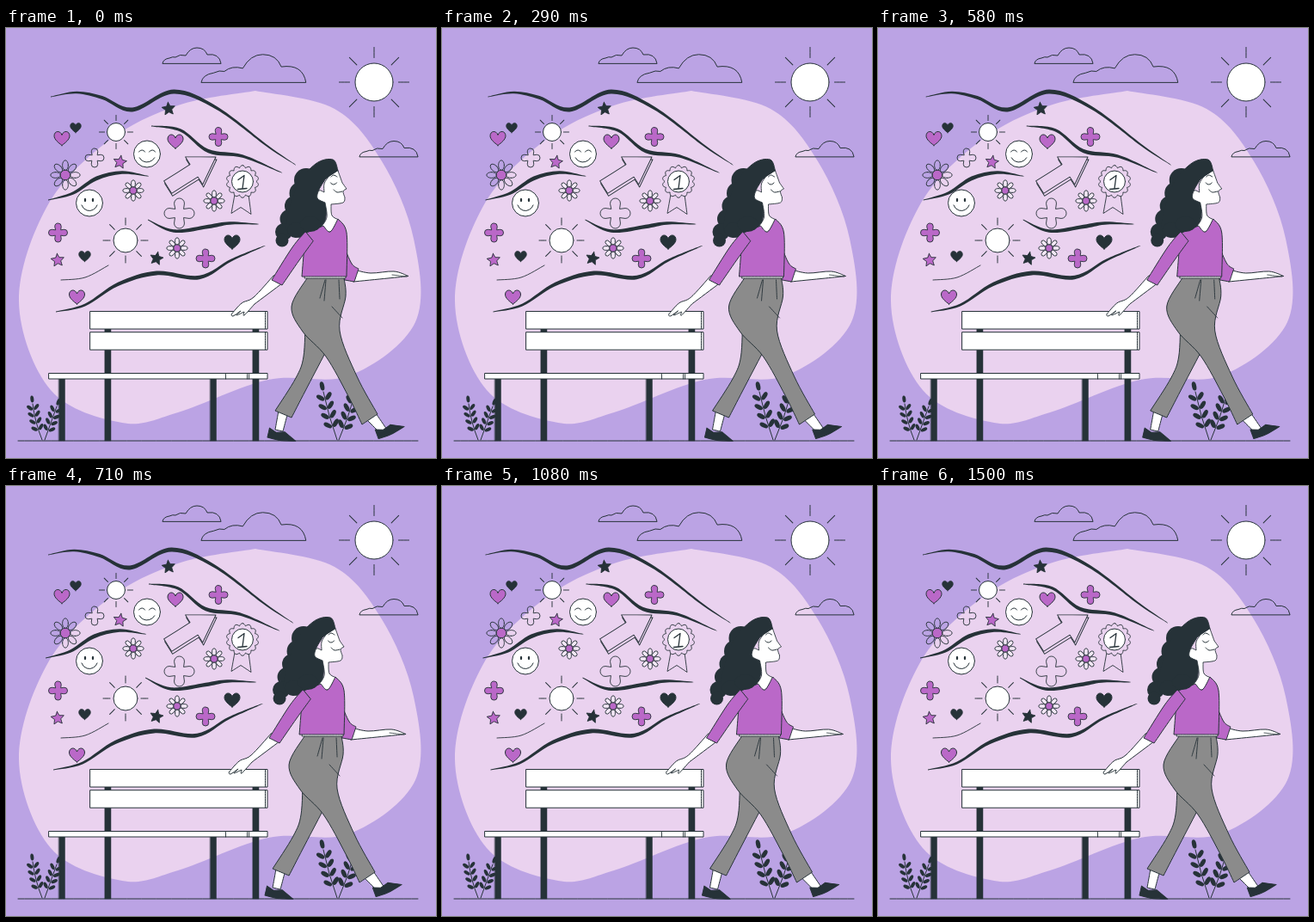
These frames come from a looping animation (500 px wide and 500 px high, 1.54 s). An HTML page with a canvas:

```html
<!DOCTYPE html>
<html lang="en">
<head>
<meta charset="utf-8">
<title>A walk in the breeze</title>
<style>
html, body { margin: 0; width: 100%; height: 100%; overflow: hidden; background: #bba3e4; }
canvas { display: block; width: 100vw; height: 100vh; }
</style>
</head>
<body>
<canvas id="stage" width="500" height="500"></canvas>
<script>
const ctx = document.getElementById('stage').getContext('2d');
const SKY = '#bba3e4', PALE = '#ead2ef', PURPLE = '#ba68c8', DARK = '#263238', WHITE = '#fff', GREY = '#8b8b8b';
const TAU = Math.PI * 2;

const points = text => text.trim().split(/\s+/).map(p => p.split(',').map(Number));

// Smooth curves through key points; "|" marks a sharp corner.
function outline(text, closed = false) {
  const path = new Path2D();
  let last = null;
  for (const part of text.split('|')) {
    const pts = points(part);
    if (last) pts.unshift(last);
    else path.moveTo(...pts[0]);
    for (let i = 0; i < pts.length - 1; i++) {
      const a = pts[Math.max(i - 1, 0)], b = pts[i], c = pts[i + 1], d = pts[Math.min(i + 2, pts.length - 1)];
      path.bezierCurveTo(b[0] + (c[0] - a[0]) / 6, b[1] + (c[1] - a[1]) / 6,
        c[0] - (d[0] - b[0]) / 6, c[1] - (d[1] - b[1]) / 6, c[0], c[1]);
    }
    last = pts[pts.length - 1];
  }
  if (closed) path.closePath();
  return path;
}

function paint(path, fill, line = 1) {
  if (fill) { ctx.fillStyle = fill; ctx.fill(path); }
  if (line) { ctx.lineWidth = line; ctx.strokeStyle = DARK; ctx.stroke(path); }
}
const shape = (text, fill, line) => paint(outline(text, true), fill, line);
const stroke = (text, line) => paint(outline(text), null, line);

function oval(x, y, rx, ry = rx, fill = WHITE, line = 1) {
  const path = new Path2D();
  path.ellipse(x, y, rx, ry, 0, 0, TAU);
  paint(path, fill, line);
}
function box(x, y, w, h, fill = WHITE, line = 1) {
  const path = new Path2D();
  path.rect(x, y, w, h);
  paint(path, fill, line);
}
function arc(x, y, r, from, to) {
  const path = new Path2D();
  path.arc(x, y, r, from * TAU, to * TAU);
  paint(path, null);
}
function at(x, y, turn, draw) {
  ctx.save();
  ctx.translate(x, y);
  ctx.rotate(turn);
  draw();
  ctx.restore();
}
function around(x, y, count, draw) {
  for (let i = 0; i < count; i++) at(x, y, i / count * TAU, draw);
}
// Closed figure whose radius is a function of the turn, 0 to 1.
function radial(x, y, steps, radius, fill, tilt = 0) {
  const path = new Path2D();
  for (let i = 0; i < steps; i++) {
    const a = (i / steps - 0.25) * TAU + tilt, r = radius(i / steps, i);
    path.lineTo(x + r * Math.cos(a), y + r * Math.sin(a));
  }
  path.closePath();
  paint(path, fill, 0.9);
}

// Swoosh that swells in the middle and tapers at both ends.
function swoosh(text, width) {
  const pts = points(text), n = pts.length - 1;
  const edge = side => pts.map(([x, y], i) => `${x},${y + side * (0.4 + width / 2 * Math.sin(Math.PI * i / n))}`);
  shape(edge(-1).join(' ') + '|' + edge(1).reverse().join(' '), DARK, 0);
}

function cloud(x, y, scale) {
  const path = new Path2D();
  path.addPath(new Path2D('M0 0Q1-5 8-6Q12-8 15-7Q20-11 27-9Q32-18 40-18Q49-18 52-10Q66-12 68 0Z'),
    new DOMMatrix([scale, 0, 0, scale, x, y]));
  paint(path);
}
function sun(x, y, r, near, far) {
  oval(x, y, r);
  around(x, y, 8, () => stroke(`${near},0 ${far},0`));
}
function heart(x, y, fill, size = 9) {
  at(x, y, 0, () => {
    ctx.scale(size / 9, size / 9);
    paint(new Path2D('M0 8C-4 5-9 1-9-3C-9-9-2-10 0-4C2-10 9-9 9-3C9 1 4 5 0 8Z'), fill);
  });
}
const star = (x, y, fill, tilt) => radial(x, y, 10, (t, i) => i % 2 ? 3.8 : 8, fill, tilt);

function cross(x, y, r, fill) {
  const w = r * 0.34, path = new Path2D();
  for (let i = 0; i < 4; i++) {
    const a = i * TAU / 4, s = Math.sin(a), c = Math.cos(a);
    path.arc(x + s * (r - w), y - c * (r - w), w, a + Math.PI, a + TAU);
    path.lineTo(x + w * 0.85 * (c + s), y + w * 0.85 * (s - c));
  }
  path.closePath();
  paint(path, fill, 0.9);
}
function flower(x, y, r, fill) {
  around(x, y, 8, () => oval(0, -r * 0.67, r * 0.2, r * 0.34, fill, 0.9));
  oval(x, y, r * 0.34, r * 0.34, PURPLE, 0.9);
}
function arrow(x, y) {
  at(x, y, -0.56, () => shape('0,0 | -30,-19 | -30,-8.5 | -66,-8.5 | -66,8.5 | -30,8.5 | -30,19', PALE, 0.9));
}
function medal(x, y) {
  shape(`${x - 9},${y + 15} | ${x - 13},${y + 37} | ${x - 2},${y + 30} | ${x + 10},${y + 38} | ${x + 7},${y + 15}`, PALE, 0.9);
  radial(x, y, 112, t => 16 + 2.8 * Math.abs(Math.cos(t * 7 * TAU)), PALE);
  oval(x, y, 12.5);
  stroke(`${x - 5},${y - 2} | ${x + 2},${y - 7} | ${x},${y + 8}`, 1.3);
  stroke(`${x - 5.5},${y + 9} ${x + 5},${y + 8}`, 1.3);
}

// Curved stem with paired leaves and one at the tip.
function branch(x0, y0, x1, y1, bend, pairs, size) {
  const cx = (x0 + x1) / 2 + bend, cy = (y0 + y1) / 2;
  paint(new Path2D(`M${x0} ${y0}Q${cx} ${cy} ${x1} ${y1}`));
  for (let i = 0; i <= pairs; i++) {
    const t = 0.25 + 0.75 * i / pairs, u = 1 - t;
    const x = u * u * x0 + 2 * u * t * cx + t * t * x1, y = u * u * y0 + 2 * u * t * cy + t * t * y1;
    const heading = Math.atan2(u * (cy - y0) + t * (y1 - cy), u * (cx - x0) + t * (x1 - cx));
    for (const side of i < pairs ? [-0.8, 0.8] : [0])
      at(x, y, heading + side, () => oval(size + 1.5, 0, size, size * 0.5, DARK, 0));
  }
}

function background() {
  ctx.fillStyle = SKY;
  ctx.fillRect(0, 0, 500, 500);
  shape('290,73 382,94 437,155 474,245 476,342 400,404 305,409 200,447 135,459 52,421 15,318 48,207 118,132 200,90 290,73', PALE, 0);
  cloud(182, 41, 1);
  cloud(227, 63, 1.79);
  cloud(411, 149.5, 1);
  sun(428, 63, 22, 28.5, 40.5);
}

function waves() {
  swoosh('52,80 82,75 112,81 147,95 195,74 245,93 305,138 335,158', 4.4);
  swoosh('169,114 203,119 235,143 275,149 318,167', 3.6);
  swoosh('49,200 78,192 105,175 135,168 164,172', 4);
  swoosh('165,223 195,236 235,231 260,227 292,228', 3.6);
  swoosh('58,330 92,322 130,298 175,285 225,290 262,270 299,254', 4);
}

function icons() {
  stroke('64,293 92,290 119,276', 0.9);
  sun(128, 121, 10.5, 13.5, 19.5);
  sun(139, 247, 14, 18, 26);

  star(189, 94, DARK, -0.1);
  star(132.5, 156, PURPLE, 0.15);
  star(60, 270, PURPLE, -0.1);
  star(175, 268, DARK, 0.2);

  heart(65, 128.5, PURPLE);
  heart(197, 132, PURPLE);
  heart(82.5, 313, PURPLE);
  heart(263, 249, DARK);
  heart(81, 116, DARK, 6.3);
  heart(91.5, 265.5, DARK, 6.8);

  cross(103, 151, 11, null);
  cross(201.5, 215.5, 17.5, null);
  cross(247, 126.5, 11, PURPLE);
  cross(60.5, 238, 11, PURPLE);
  cross(232, 268, 11, PURPLE);

  flower(69, 171, 17, null);
  flower(148, 189, 12, '#f4e8f7');
  flower(242, 201, 12, '#f4e8f7');
  flower(199, 256, 12, '#f4e8f7');

  oval(164, 146.5, 15.5);
  for (const x of [158, 170]) arc(x, 146, 4, 0.58, 0.92);
  arc(164, 146, 10, 0.08, 0.42);
  oval(97, 203.5, 15.5);
  for (const x of [92, 101]) oval(x, 200, 1.2, 2.2, DARK, 0);
  arc(97, 203, 9.5, 0.05, 0.45);

  arrow(245, 153);
  arrow(244, 150);
  medal(275, 178.5);
}

function scenery() {
  stroke('14,480 479,480');
  branch(42, 479, 31, 437, -3, 4, 4);
  branch(45, 479, 59, 440, 0, 4, 4);
  branch(385, 479, 369, 423, -2, 4, 5.2);
  branch(387, 479, 405, 428, 2, 4, 5.2);

  for (const x of [115, 287]) box(x, 340, 7, 140, DARK, 0.5);
  for (const x of [61.5, 237.5]) box(x, 405, 7, 75, DARK, 0.5);
  for (const y of [329.5, 353.7]) {
    box(98, y, 206, 20.5);
    stroke(`301.5,${y} 301.5,${y + 20}`);
  }
  box(50, 401.5, 254, 6.5);
  for (const x of [255.5, 280.5, 282.5]) stroke(`${x},401.5 ${x},408`);
}

function shoe(x, y, turn) {
  at(x, y, turn, () => shape('1,-11 -1,0 | 14,3 32,3 | 19,-7 | 9,-6', DARK));
}

function legs() {
  shape('317,445 | 313,467 | 322,469 | 327,450', WHITE);
  shoe(305, 476, 0.04);
  shape('348,340 346,382 337,407 313,445 | 332,453 | 348,422 370,380', GREY);
  shape('419,455 | 434,470 | 443,467 | 430,448', WHITE);
  shoe(434, 477, -0.53);
  shape('350,291 332,324 345,353 372,382 398,428 414,461 | 432,449 | 408,405 388,352 395,312 393,291', GREY);
  stroke('371,293 365,314', 0.9);
  stroke('372,293 370,317', 0.9);
  stroke('387,293 388,315', 0.9);
  stroke('379,324 391,337', 0.9);
}

function farArm() {
  shape('405,281 424,285 451,283 468,288.5 | 444,291 404,295', WHITE);
  stroke('449,287 466,289', 0.8);
  shape('393,254 402,274 410,280 | 405,295 | 394,293', PURPLE);
}

function nearArm() {
  shape('311,288 288,313 274,320 262,333 | 264,335 273,329 | 268,334 277,330 | 277,334 289,321 | 321,297', WHITE);
  shape('348,237 333,255 309,293 | 321,299 | 341,270 357,248', PURPLE);
}

function hair() {
  for (let i = 0; i < 5; i++) oval(349 - 6.5 * i, 177 + 15 * i, 14 - i, 14 - i, DARK, 0);
  oval(321, 247, 7.5, 7.5, DARK, 0);
  shape('386,166 380,153 360,158 338,185 326,234 345,243 368,231 372,205 362,194 371,176', DARK);
}

function face() {
  shape('386,166 391,180 | 396,187 | 392,190 394,197 | 392,203 378,205 | 379,218 387,223 | 377,237 366,232 ' +
    '| 373,220 371,203 | 362,198 364,189 370,191 | 370,181 375,173', WHITE, 0.9);
  arc(381, 178, 4, 0.08, 0.42);
  stroke('378,173 381,171 385,173');
  stroke('381,188 385,191 391,190');
}

function woman() {
  farArm();
  legs();
  shape('348,286 | 347,291 | 395,291 | 395,286', WHITE, 0.9);
  hair();
  face();
  shape('347,239 369,230 | 377,237 386,222 | 396,238 396,289 | 344,289 | 346,264', PURPLE);
  nearArm();
  oval(337, 235, 10, 9, DARK, 0);
  oval(354, 228, 12, 9, DARK, 0);
}

// Sideways shake: offsets at each tenth of a cycle, joined linearly.
const SHAKE = [0, -1, 2, -4, 4, -4, 4, -4, 2, -1, 0];
const CYCLE = 1500, LOOP = 1540, STEP = 1000 / 24, LEAD = 25;

function shake(time) {
  const p = (time + LEAD) % CYCLE / CYCLE * 10, i = Math.floor(p);
  return SHAKE[i] + (SHAKE[i + 1] - SHAKE[i]) * (p - i);
}

function render(now) {
  const step = Math.min(36, Math.floor((now % LOOP + 4.9) / STEP));
  const dx = shake(step * STEP) - shake(0);
  ctx.lineJoin = ctx.lineCap = 'round';
  background();
  at(dx, 0, 0, waves);
  icons();
  scenery();
  at(dx, 0, 0, woman);
}

let start;
function tick(now) {
  start ??= now;
  render(now - start);
  requestAnimationFrame(tick);
}
render(0);
requestAnimationFrame(tick);
</script>
</body>
</html>
```
